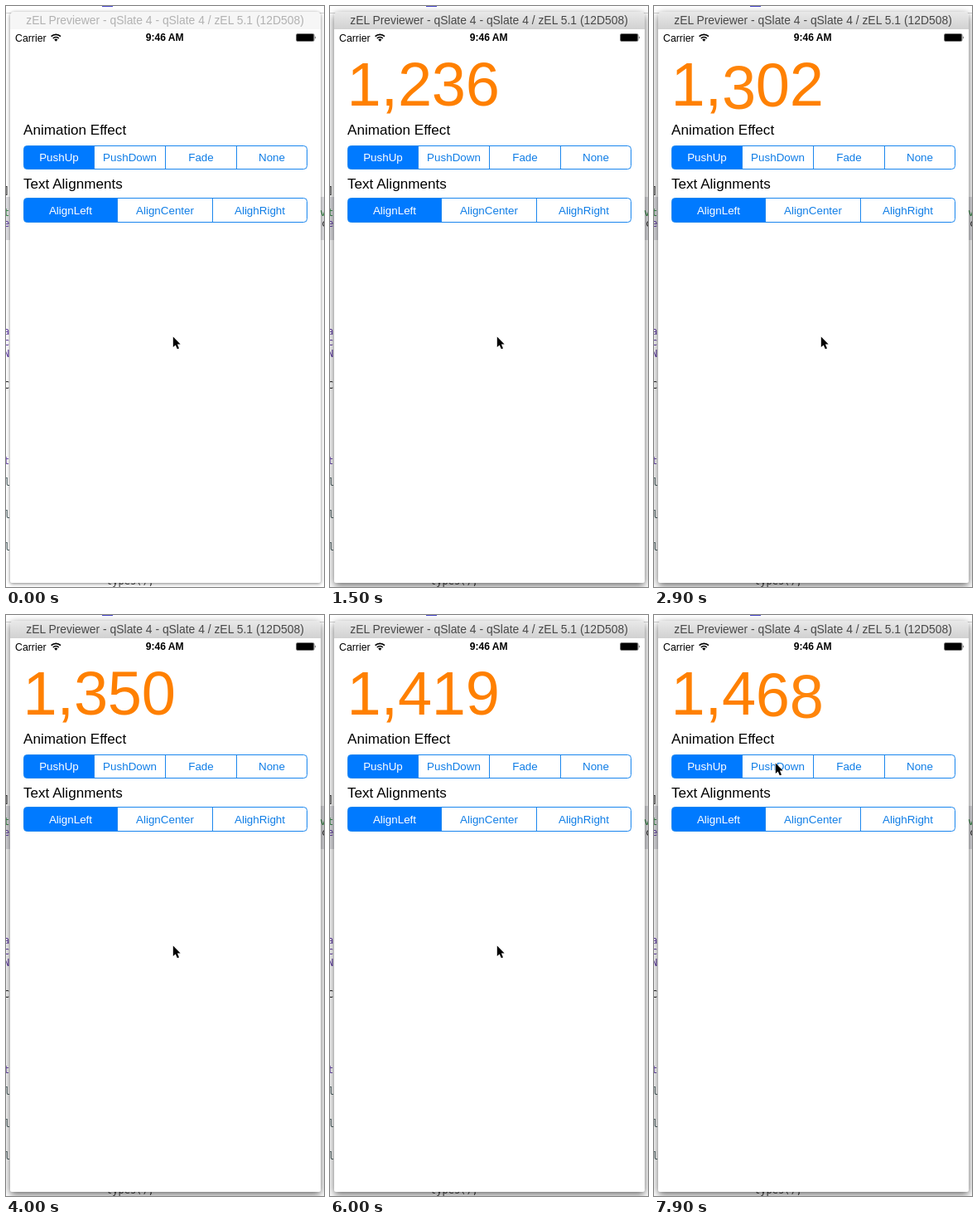
Write an HTML page that moves like this. It is 384 px wide and 700 px high and loops after 8000 ms.

```html
<!DOCTYPE html>
<html lang="en">
<head>
<meta charset="utf-8">
<title>Number label demo</title>
<style>
  html, body { margin: 0; width: 100%; height: 100%; overflow: hidden; background: #fff; }
  svg { display: block; width: 384px; height: 700px; font-family: "Liberation Sans", Arial, sans-serif; }
  .mid { text-anchor: middle; }
  .code { font: 12px "DejaVu Sans Mono", monospace; }
  .seg { font-size: 13.4px; fill: #0f7de6; }
  .seg .on { fill: #fff; }
  .big { font-size: 74px; fill: #ff8000; }
  #frame { fill: #fff; filter: drop-shadow(0 1px 2px rgba(0,0,0,.5)); }
  #bar { fill: #f6f6f6; }
  #title { font-size: 13.9px; fill: #b2b2b2; }
  .active #frame { filter: drop-shadow(0 3px 5px rgba(0,0,0,.6)); }
  .active #bar { fill: url(#metal); }
  .active #title { fill: #484848; }
</style>
</head>
<body>
<svg id="stage" viewBox="0 0 384 700">
  <defs>
    <linearGradient id="metal" x2="0" y2="1">
      <stop stop-color="#e9e9e9"/><stop offset="1" stop-color="#d1d1d1"/>
    </linearGradient>
    <clipPath id="slot"><rect x="16" y="56" width="350" height="78"/></clipPath>
  </defs>

  <rect width="384" height="700" fill="#fff"/>
  <rect y="230" width="384" height="52" fill="#dedee2"/>
  <path d="M116 .5h13" stroke="#4848c8"/>
  <path d="M0 8.5h384" stroke="#d4d4d4"/>
  <g id="code" class="code"></g>

  <path id="frame" d="M5 12a5 5 0 0 1 5-5H375a5 5 0 0 1 5 5V693a2 2 0 0 1-2 2H7a2 2 0 0 1-2-2Z"/>
  <path id="bar" d="M5 28V12a5 5 0 0 1 5-5H375a5 5 0 0 1 5 5V28Z"/>
  <text id="title" class="mid" x="192" y="22">zEL Previewer - qSlate 4 - qSlate 4 / zEL 5.1 (12D508)</text>

  <text x="11" y="43" font-size="12.3">Carrier</text>
  <g fill="none" stroke="#000" stroke-width="1.7">
    <path d="M54.6 36.6a8.2 8.2 0 0 1 11.4 0M56.8 39a5 5 0 0 1 7 0"/>
  </g>
  <path d="M58.2 40.6a3 3 0 0 1 4.2 0L60.3 42.8Z"/>
  <text class="mid" x="191.7" y="42.3" font-size="12.1" font-weight="bold">9:46 AM</text>
  <rect x="350.5" y="33.5" width="21.5" height="9" rx="1.5" fill="none" stroke="#555" stroke-width=".8"/>
  <rect x="351" y="34" width="20.5" height="8" rx=".8"/>
  <path d="M373 36.3q1.4 1.7 0 3.4Z"/>

  <g id="digits" class="big" clip-path="url(#slot)"></g>

  <g font-size="17.1">
    <text x="21" y="155">Animation Effect</text>
    <text x="21" y="220">Text Alignments</text>
  </g>
  <g id="segments" class="seg"></g>

  <path id="cursor" d="M0 0V12.6L2.9 9.9 5 14.8 7.2 13.9 5.1 9H8.8Z" stroke="#fff" stroke-width="1" paint-order="stroke"/>
</svg>
<script>
const LOOP = 8000, PUSH = 300, SLOT = 78, BASE = 120.2;
const $ = id => document.getElementById(id);

function add(parent, tag, attrs, text = '') {
  const el = document.createElementNS('http://www.w3.org/2000/svg', tag);
  for (const k in attrs) el.setAttribute(k, attrs[k]);
  el.textContent = text;
  parent.append(el);
  return el;
}

// Slivers of the editor behind the window: x, baseline, text, colour
[
  [-3, 227, ']', '#222'], [-3, 253, 't', '#2a7f3a'], [-3, 266, 'e', '#5a35a0'],
  [-3, 396, 'a', '#5a35a0'], [-3, 409, 'c', '#5a35a0'], [-3, 423, 'N', '#5a35a0'],
  [-3, 461, 'C', '#222'], [-3, 552, 't', '#5a35a0'], [-2, 578, 'l', '#465a5c'],
  [-2, 617, 'l', '#465a5c'], [-2, 656, 'l', '#465a5c'],
  [379, 253, 'v', '#2a7f3a'], [381, 266, 'c', '#222'], [121, 697, 'types();', '#444']
].forEach(([x, y, s, fill]) => add($('code'), 'text', { x, y, fill }, s));

function segmented(y, h, edges, labels) {
  const g = $('segments'), blue = '#007aff', line = '#1a86ee';
  add(g, 'path', { d: `M${edges[1]} ${y}V${y + h}H25.5a4 4 0 0 1-4-4V${y + 4}a4 4 0 0 1 4-4Z`, fill: blue });
  add(g, 'rect', { x: 21.5, y, width: 342, height: h, rx: 4, fill: 'none', stroke: line });
  labels.forEach((s, i) => {
    if (i) add(g, 'path', { d: `M${edges[i]} ${y}v${h}`, stroke: line });
    add(g, 'text', { x: (edges[i] + edges[i + 1]) / 2, y: y + h / 2 + 4.6, class: i ? 'mid' : 'mid on' }, s);
  });
}
segmented(168.5, 28, [21.5, 106.5, 192.5, 278.5, 363.5], ['PushUp', 'PushDown', 'Fade', 'None']);
segmented(231.5, 29, [21.5, 134.5, 249.5, 363.5], ['AlignLeft', 'AlignCenter', 'AlighRight']);

// Start time, value, delay between neighbouring columns
const steps = [
  [650, '1,236', 0], [1640, '1,271', 0], [2600, '1,302', -20], [3560, '1,350', 0],
  [4750, '1,380', 0], [5650, '1,419', 0], [6650, '1,453', 0], [7640, '1,468', 13]
];
const columns = [20.5, 61.4, 81.9, 122.8, 163.7].map(x =>
  [0, 1].map(() => add($('digits'), 'text', { x, y: BASE })));

const clamp = p => Math.min(1, Math.max(0, p));
const ease = p => p * p * (3 - 2 * p);

function place(el, char, shift, alpha) {
  if (el.textContent !== char) el.textContent = char;
  el.setAttribute('y', BASE + shift * SLOT);
  el.setAttribute('opacity', alpha);
}

function drawColumn([leaving, entering], i, t) {
  let from = '', to = '', p = 1;
  for (const [start, value, lag] of steps) {
    const begin = start + (i - 4) * lag;
    if (t < begin) break;
    if (value[i] === to) continue;
    from = to;
    to = value[i];
    p = ease(clamp((t - begin) / PUSH));
  }
  place(leaving, p < 1 ? from : '', -p, 1 - p);
  place(entering, to, 1 - p, p);
}

// Time and tip position of the pointer
const path = [[7130, 201.8, 398.5], [7400, 184.8, 337.5], [7860, 146.8, 178.5]];

function pointer(t) {
  const k = t < path[1][0] ? 0 : 1;
  const [t0, x0, y0] = path[k], [t1, x1, y1] = path[k + 1];
  const p = clamp((t - t0) / (t1 - t0));
  return [x0 + (x1 - x0) * p, y0 + (y1 - y0) * p];
}

function draw() {
  const t = performance.now() % LOOP;
  $('stage').classList.toggle('active', t >= 500);
  columns.forEach((col, i) => drawColumn(col, i, t));
  $('cursor').setAttribute('transform', `translate(${pointer(t)})`);
  requestAnimationFrame(draw);
}
draw();
</script>
</body>
</html>
```
